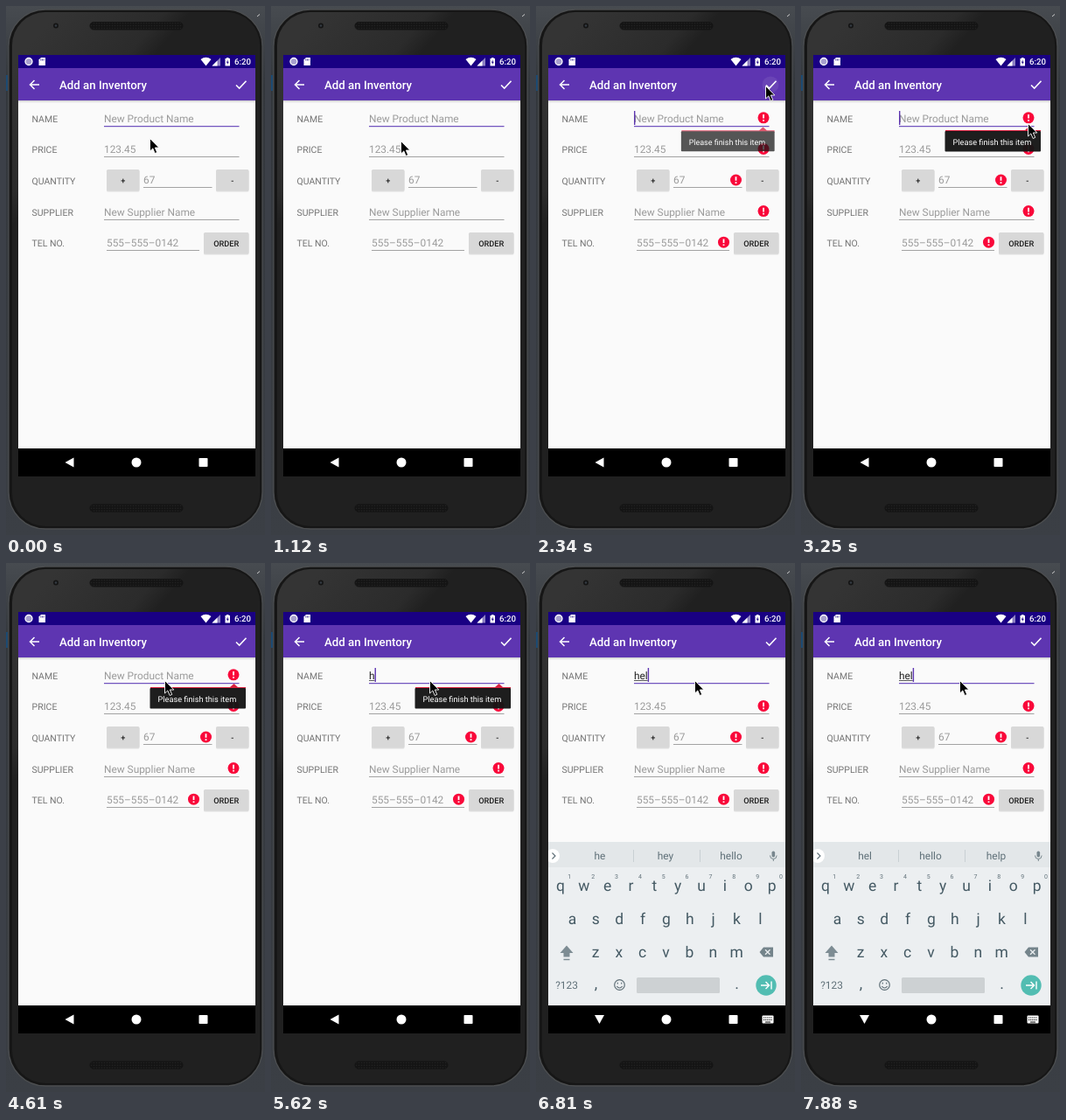
Recreate the animation shown at these times as an HTML page. Size 296 px wide and 605 px high, loop 7990 ms.

```html
<!DOCTYPE html>
<html lang="en">
<head>
<meta charset="utf-8">
<title>Inventory form</title>
<style>
html, body { margin: 0; width: 296px; height: 605px; overflow: hidden; background: #3b3f45; }
svg { display: block; }
text { font-family: Roboto, sans-serif; white-space: pre; text-rendering: geometricPrecision; }
.label { font-size: 10.55px; fill: #747474; }
.hint { font-size: 11.86px; fill: #9b9b9b; }
.btn { font-size: 9.2px; font-weight: 500; fill: #1c1c1c; text-anchor: middle; }
.key { font-size: 17.5px; fill: #455a64; text-anchor: middle; }
.num { font-size: 7px; fill: #607078; text-anchor: middle; }
.word { font-size: 11.9px; fill: #5f7078; text-anchor: middle; }
.line { fill: none; stroke: #607078; stroke-width: 1.2; }
</style>
</head>
<body>
<svg width="296" height="605" viewBox="0 0 296 605">
  <defs>
    <linearGradient id="outside" x2="0" y2="1">
      <stop offset="0" stop-color="#474b50"/><stop offset=".15" stop-color="#33373c"/><stop offset="1" stop-color="#3b3f45"/>
    </linearGradient>
    <linearGradient id="face" gradientUnits="userSpaceOnUse" x1="60" y1="5" x2="150" y2="80">
      <stop offset="0" stop-color="#343434"/><stop offset=".8" stop-color="#2b2b2b"/><stop offset="1" stop-color="#202020"/>
    </linearGradient>
    <linearGradient id="shade" x2="0" y2="1">
      <stop offset="0" stop-opacity=".18"/><stop offset="1" stop-opacity="0"/>
    </linearGradient>
    <pattern id="mesh" width="3" height="3" patternUnits="userSpaceOnUse">
      <rect width="3" height="3" fill="#141414"/><circle cx="1.5" cy="1.5" r=".8" fill="#222"/>
    </pattern>
    <clipPath id="screen"><path d="M14 56H285V538H14Z"/></clipPath>
    <g id="alert">
      <circle r="6.5" fill="#f9083a"/>
      <path d="M0-3.8V.8M0 2.2V3.9" stroke="#fff" stroke-width="1.8"/>
    </g>
  </defs>

  <rect width="296" height="605" fill="url(#outside)"/>
  <rect y="79" width="2" height="18" fill="#1c4a72"/>
  <path d="M287 12L290 9.500" stroke="#ccc"/>
  <rect x="3" y="4" width="290" height="594" rx="42" fill="#161616" stroke="#4c4e50" stroke-width="1.300"/>
  <rect x="7" y="7" width="283" height="588" rx="38" fill="url(#face)"/>
  <g fill="url(#mesh)" stroke="#141414">
    <rect x="96" y="18.5" width="106" height="8.5" rx="4.2"/>
    <rect x="96" y="570" width="106" height="8.5" rx="4.2"/>
  </g>
  <circle cx="57" cy="22.5" r="3" fill="#151515"/><circle cx="57" cy="22.5" r="1.3" fill="#343a42"/>

  <g clip-path="url(#screen)">
    <rect x="14" y="56" width="271" height="482" fill="#fafafa"/>
    <rect x="14" y="108" width="271" height="3" fill="url(#shade)"/>
    <rect x="14" y="56" width="271" height="15" fill="#190083"/>
    <rect x="14" y="71" width="271" height="37" fill="#5e35b1"/>

    <circle cx="26" cy="63.5" r="4" fill="#a79fce" stroke="#fff" stroke-width="1.3"/>
    <path d="M40 59H45V68H37.5V61.5Z" fill="#fff"/>
    <path d="M39.8 60.5V62.5M41.5 60.5V62.5M43.2 60.5V62.5" stroke="#190083" stroke-width=".7"/>
    <path d="M222.5 61Q228.5 56.5 234.5 61L228.5 68.5Z" fill="#fff"/>
    <path d="M235.5 68.5L245 59V68.5Z" fill="#8c80c2"/><path d="M235.5 68.5L241.5 62.5V68.5Z" fill="#fff"/>
    <path d="M250.5 60H252V59H254.5V60H256V68.5H250.5Z" fill="#fff"/>
    <path d="M253.7 61.3L251.8 64.7H253.2L252.8 67.2L254.8 63.8H253.4Z" fill="#190083"/>
    <text x="261" y="67.2" font-size="9.6" font-weight="500" fill="#fff">6:20</text>

    <path d="M38 90H28M32.5 85L27.5 90L32.5 95" fill="none" stroke="#fff" stroke-width="1.5"/>
    <text x="61" y="95" font-size="13.25" font-weight="500" fill="#fff">Add an Inventory</text>
    <path d="M263 90.5L266.7 94L274.5 85.8" fill="none" stroke="#fff" stroke-width="1.6"/>
    <circle id="ripple" cx="268" cy="90" r="9.5" fill="#fff"/>

    <g id="form"></g>
    <path d="M112 137.6H266.5" stroke="#7254bf" stroke-width="1.3"/>
    <text id="typed" class="hint" x="112" y="132.6" style="fill:#222"></text>
    <path id="under" stroke="#333" stroke-width=".8"/>
    <rect id="caret" y="120" width="1.4" height="16" fill="#5e35b1"/>
    <g id="alerts"></g>
    <g id="popup">
      <path d="M165 142H256L260.5 138L265 142H274V143.5H165Z" fill="#d9213f"/>
      <rect x="164.5" y="143" width="109.5" height="23.5" rx="1" fill="#151515" fill-opacity=".96"/>
      <text x="173.5" y="158.7" font-size="9.2" fill="#fff">Please finish this item</text>
    </g>

    <rect x="14" y="506" width="271" height="32"/>
    <g fill="#fff">
      <path id="back" d="M67.5 522L77.5 516.5V527.5Z"/>
      <circle cx="149" cy="522" r="5.5"/>
      <rect x="220.5" y="517" width="10" height="10" rx=".8"/>
      <g id="imeIcon">
        <rect x="258.5" y="517.5" width="13" height="9" rx="1"/>
        <path d="M260 520H270M260 522.5H270" stroke="#000" stroke-width="1.1" stroke-dasharray="1.2 .9"/>
        <path d="M262 525H268" stroke="#000"/>
      </g>
    </g>

    <g id="board">
      <rect x="14" y="319" width="271" height="187" fill="#eceff1"/>
      <rect x="14" y="319" width="271" height="29" fill="#e3e7e9"/>
      <path d="M111.5 328V342M187.5 328V342" stroke="#c9d0d3"/>
      <circle cx="19" cy="335" r="8" fill="#fff"/>
      <path class="line" d="M18.5 331.5L22 335L18.5 338.5"/>
      <rect x="269.5" y="329.5" width="3.6" height="7" rx="1.8" fill="#78878e"/>
      <path d="M267.5 334.5Q267.5 338.5 271.3 338.5T275.1 334.5M271.3 338.5V341" fill="none" stroke="#78878e"/>
      <g id="words"></g>
      <g id="keys"></g>
      <path d="M35 437.5L27.5 446H31.5V450.5H38.5V446H42.5Z" fill="#7d8c93"/>
      <path d="M31.5 453.5H38.5" stroke="#7d8c93" stroke-width="1.5"/>
      <path d="M255.5 445L260 439.5H271V450.5H260Z" fill="#74848b"/>
      <path d="M262 442.3L267.5 447.8M267.5 442.3L262 447.8" stroke="#eceff1" stroke-width="1.3"/>
      <circle class="line" cx="95.5" cy="482.5" r="5.8"/>
      <path class="line" d="M92.3 484Q95.5 488 98.7 484M93.3 479.8V481.5M97.7 479.8V481.5"/>
      <rect x="115" y="474" width="95" height="18" rx="1.5" fill="#cdd1d3"/>
      <circle cx="263" cy="483" r="11.7" fill="#52bdb2"/>
      <path d="M257 483H266M262.5 479L266.5 483L262.5 487M269 478.5V487.5" fill="none" stroke="#fff" stroke-width="1.4"/>
    </g>
  </g>
  <path id="pointer" d="M0 0V14.5L3.3 11.4L5.7 17L8.2 15.9L5.8 10.5H10.3Z" stroke="#fff" stroke-width=".9"/>
</svg>

<script>
const LOOP = 7990, TICK = 60, BLINK = 998, CLICK = 2170, KEYBOARD = 5620;
const $ = id => document.getElementById(id);
const text = (cls, x, y, s) => `<text class="${cls}" x="${x}" y="${y}">${s}</text>`;
const rule = (x1, x2, y) => `<path d="M${x1} ${y}H${x2}" stroke="#a3a3a3"/>`;
const button = (x, y, w, s) =>
  `<rect x="${x}" y="${y + 1}" width="${w}" height="24.5" rx="1.5" opacity=".1"/>
   <rect x="${x}" y="${y}" width="${w}" height="24.5" rx="1.5" fill="#d8d8d8"/>` +
  text('btn', x + w / 2, y + 15.5, s);
const field = (x1, x2, y, s) => text('hint', x1, y - 4.6, s) + rule(x1, x2, y);

$('form').innerHTML =
  ['NAME', 'PRICE', 'QUANTITY', 'SUPPLIER', 'TEL NO.']
    .map((s, i) => text('label', 29.5, 132.5 + i * 35.7, s)).join('') +
  '<text id="nameHint" class="hint" x="112" y="132.6">New Product Name</text>' +
  field(112, 266.5, 172.5, '123.45') + field(157, 235.5, 207.5, '67') +
  field(112, 266.5, 244.5, 'New Supplier Name') + field(115, 221, 279.5, '555–555–0142') +
  button(115, 187, 37.5, '+') + button(240, 187, 37.5, '-') + button(226, 259, 51.5, 'ORDER');

$('alerts').innerHTML = [260, 260, 228.5, 260, 214.5]
  .map((x, i) => `<use href="#alert" x="${x}" y="${127.8 + i * 35.6}"/>`).join('');

const row = (cls, chars, x, y) =>
  [...chars].map((c, i) => text(cls, x + i * 26.85, y, c)).join('');
$('keys').innerHTML =
  row('key', 'qwertyuiop', 28, 374.5) + row('key', 'asdfghjkl', 41.5, 413) +
  row('key', 'zxcvbnm', 68, 451) + row('num', '1234567890', 38.3, 360.5) +
  text('word', 35, 487, '?123') + text('key', 68.5, 487, ',') + text('key', 229.5, 487, '.');
$('words').innerHTML = [73, 148, 223].map(x => text('word', x, 339, '')).join('');

const typing = [[5620, 'h'], [5800, 'he'], [6810, 'hel'], [7100, 'help'], [7820, 'hel']];
const guesses = { he: 'he hey hello', hel: 'hel hello help', help: 'help helped helps' };

// Each move is one curve: start, end, bend x and y, goal x and y.
const home = [164, 151];
const moves = [
  [60, 710, 168, 168, 148, 149],
  [1010, 1760, 147, 200, 258, 84],
  [1820, 2000, 259, 79, 262, 91],
  [2510, 2960, 267, 108, 260, 129],
  [3140, 3650, 258, 154, 181, 134]
];

const last = (list, t) => list.findLast(e => e[0] <= t);
const clamp = v => Math.min(1, Math.max(0, v));
const ease = u => u * u * (3 - 2 * u);
// Progress from 0 to 1, advancing once per tick.
const ramp = (t, start, length) => clamp(Math.floor((t - start) / TICK) * TICK / length);

function pointerAt(t) {
  return moves.reduce((from, [start, end, bx, by, x, y]) => {
    const u = ease(ramp(t + TICK, start, end - start + TICK));
    const curve = (a, b, c) => a * (1 - u) ** 2 + 2 * b * u * (1 - u) + c * u * u;
    return t < start ? from : [curve(from[0], bx, x), curve(from[1], by, y)];
  }, home);
}

const attr = (id, name, value) => $(id).setAttribute(name, value);
const show = (el, on) => { el.style.display = on ? '' : 'none'; };
const write = (el, s) => { if (el.textContent !== s) el.textContent = s; };

function render(t) {
  const [x, y] = pointerAt(t);
  attr('pointer', 'transform', `translate(${Math.round(x) + .5} ${Math.round(y) + .5})`);

  // Every key press restarts the caret's blinking.
  const [pressed, value] = last(typing, t) || [135, ''];
  write($('typed'), value);
  const width = value ? $('typed').getComputedTextLength() : 0;
  attr('under', 'd', `M112 134.5h${width}`);
  attr('caret', 'x', 112 + width);
  show($('caret'), t >= pressed && (t - pressed) % BLINK < 480);
  show($('nameHint'), !value);

  show($('alerts'), t >= CLICK);
  show($('alerts').firstChild, !value);
  const shown = ramp(t + TICK, CLICK, 240) * (1 - ramp(t, KEYBOARD, 190));
  attr('popup', 'opacity', shown);
  attr('popup', 'transform', `translate(219 153) scale(${.9 + .1 * shown}) translate(-219 -153)`);
  attr('ripple', 'opacity', t < CLICK ? 0 : .22 * (1 - ramp(t, CLICK, 180)));

  const left = (1 - ramp(t, KEYBOARD, 300)) ** 2;
  attr('board', 'transform', `translate(0 ${59 * left})`);
  attr('board', 'opacity', 1 - left);
  show($('imeIcon'), left < 1);
  attr('back', 'transform', left < 1 ? 'rotate(-90 72.5 522)' : '');

  const known = last(typing, t - TICK);
  (guesses[known && known[1]] || guesses.he).split(' ')
    .forEach((w, i) => write($('words').children[i], w));
}

const began = performance.now();
(function tick() {
  render((performance.now() - began) % LOOP);
  requestAnimationFrame(tick);
})();
</script>
</body>
</html>
```
